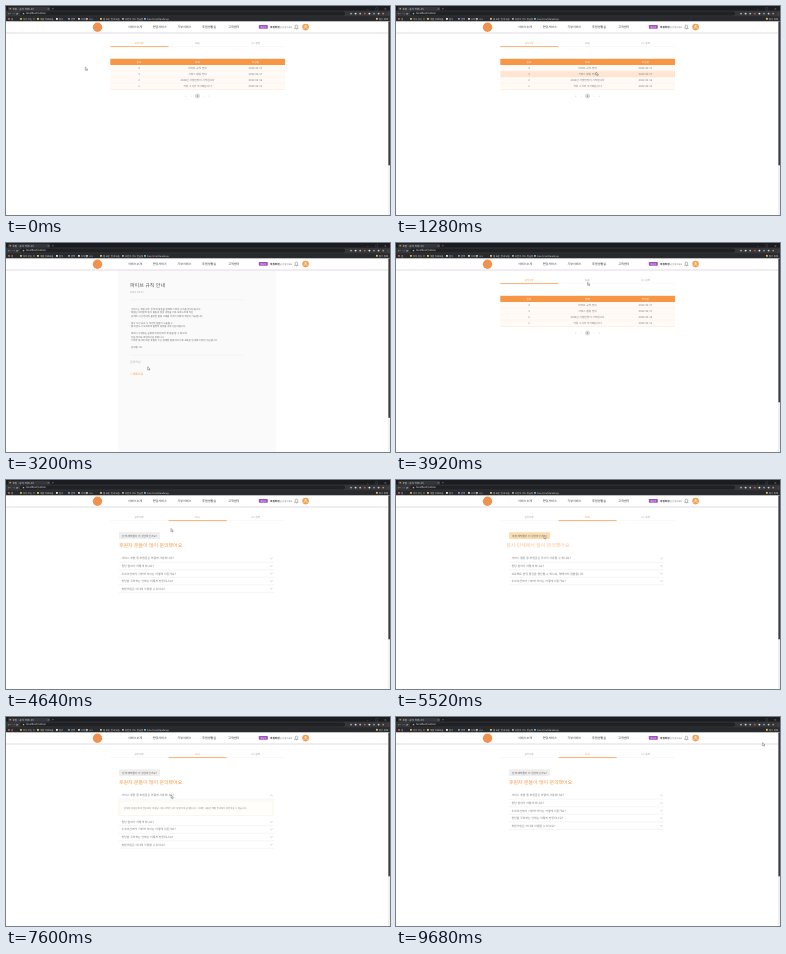
An HTML page for the animation above (9840 ms loop, 384x209 px).

```html
<!DOCTYPE html>
<html lang="ko">
<head>
<meta charset="utf-8">
<style>
html, body { margin: 0; width: 100%; height: 100%; overflow: hidden; background: #fff; }
svg { display: block; width: 100vw; height: 100vh; }
text { font-family: "Noto Sans CJK KR", "Noto Sans CJK", "Noto Sans", sans-serif; white-space: pre; }
</style>
</head>
<body>
<svg id="stage" viewBox="0 0 384 209" text-rendering="geometricPrecision"></svg>
<script>
const LOOP = 9840;
const ORANGE = '#f79645';
const stage = document.getElementById('stage');

function add(parent, tag, attrs = {}) {
  const el = document.createElementNS('http://www.w3.org/2000/svg', tag);
  for (const k in attrs) el.setAttribute(k, attrs[k]);
  parent.appendChild(el);
  return el;
}
const group = (p, attrs) => add(p, 'g', attrs);
const rect = (p, x, y, width, height, fill, more) => add(p, 'rect', { x, y, width, height, fill, ...more });
const circle = (p, cx, cy, r, fill, more) => add(p, 'circle', { cx, cy, r, fill, ...more });
const line = (p, x1, x2, y, stroke, w = 0.4) => add(p, 'line', { x1, x2, y1: y, y2: y, stroke, 'stroke-width': w });
const path = (p, d, stroke, w = 0.4) => add(p, 'path', { d, stroke, fill: 'none', 'stroke-width': w });
// y is the vertical middle of the line
function text(p, str, x, y, size, fill, more) {
  const el = add(p, 'text', { x, y: y + size * 0.36, 'font-size': size, fill, ...more });
  el.textContent = str;
  return el;
}
const mid = { 'text-anchor': 'middle' };
const show = (el, on) => el.setAttribute('display', on ? 'inline' : 'none');

rect(stage, 0, 0, 384, 209, '#fff');
const article = group(stage);
const tabs = group(stage);
const list = group(stage);
const faq = group(stage);
const header = group(stage);
const chrome = group(stage);

function drawChrome(g) {
  rect(g, 0, 0, 384, 15.3, '#292a2d');
  rect(g, 0, 0, 384, 4.7, '#1b1c1f');
  rect(g, 2, 0.8, 42, 4, '#35363a', { rx: 1 });
  rect(g, 0, 4.7, 384, 5.6, '#35363a');
  circle(g, 4.2, 2.7, 0.8, ORANGE);
  text(g, '후원 - 공지 커뮤니티', 6.5, 2.7, 2.5, '#d8d8d8');
  text(g, '×', 41, 2.7, 3, '#bbb');
  text(g, '+', 46, 2.7, 3.4, '#bbb');
  ['–', '□', '×'].forEach((s, i) => text(g, s, 361 + i * 8.5, 2.6, 2.8, '#ccc'));
  rect(g, 14, 5.5, 325, 4, '#202124', { rx: 2 });
  text(g, '←', 2, 7.5, 3, '#ddd');
  text(g, '→', 6, 7.5, 3, '#888');
  text(g, '⟳', 10, 7.5, 3, '#ddd');
  rect(g, 16.8, 6.9, 1.4, 1.4, '#aaa');
  text(g, 'localhost/notice', 20, 7.5, 2.6, '#eee');
  ['#aaa', '#ddd', '#b8b8b8', '#d64b3f', '#eee', '#8b9cc0', '#ccc', '#c9805c']
    .forEach((c, i) => circle(g, 345 + i * 4.6, 7.6, 0.95, c));
  text(g, '⋮', 380.5, 7.5, 3, '#ddd');

  const marks = [
    [3, '앱', '#d85a4a'], [15, '자주 쓰는 것', '#e8b64b'], [32, '개발 자료모음', '#f0ca55'],
    [51, '문서', '#efefef'], [63, '번역', '#6a9ee8'], [73, '디자인', '#ddd'],
    [81, '소스', '#bbb'], [95, '웹 표준 안내 모음', '#e7c265'],
    [117, '프런트 코드 연습장', '#aaa'], [139, 'Front-End Roadmap', '#62c4dc']
  ];
  for (const [x, label, c] of marks) {
    rect(g, x - 1, 11.9, 1.9, 1.9, c, { rx: 0.4 });
    text(g, label, x + 2, 12.8, 2.3, '#ddd');
  }
  rect(g, 370, 11.9, 1.8, 1.8, '#e5c15a');
  text(g, '읽기 목록', 373, 12.8, 2.3, '#ddd');
}

function drawHeader(g) {
  rect(g, 0, 15.3, 382, 11.7, '#fff');
  line(g, 0, 382, 27, '#d2ccd5', 0.7);
  circle(g, 91.5, 21.2, 4.7, '#ef9150');
  ['서비스소개', '펀딩서비스', '기부서비스', '후원생활실', '고객센터']
    .forEach((s, i) => text(g, s, 129 + i * 24.7, 21, 3.05, '#333', { ...mid, 'font-weight': 500 }));
  rect(g, 252.8, 18.9, 9, 3.9, '#a04fc0', { rx: 0.7 });
  text(g, '후원자', 257.3, 20.8, 2.3, '#fff', mid);
  text(g, '후원회원', 264, 20.9, 2.6, '#333', { 'font-weight': 700 });
  text(g, '님 안녕하세요', 273.7, 20.9, 2.2, '#777');
  path(g, 'M288.6 22.4h3.6l-.6-.8v-1.3a1.2 1.2 0 0 0-2.4 0v1.3zM290 23h.8', '#555', 0.4);
  circle(g, 299.6, 21.1, 3.3, '#f0a052');
  circle(g, 299.6, 20.2, 1.1, '#fbe0bd');
  path(g, 'M297.7 23a1.9 1.5 0 0 1 3.8 0', '#fbe0bd', 0.7);
}

const tabLabels = [];
function drawTabs(g) {
  ['공지사항', 'FAQ', '1:1 문의'].forEach((s, i) =>
    tabLabels.push(text(g, s, 133 + i * 58.3, 37.2, 2.5, '#888', mid)));
  line(g, 104.3, 279, 40.6, '#eee', 0.4);
  return line(g, 104.3, 162.5, 40.6, ORANGE, 0.7);
}

const rows = [];
function drawList(g) {
  rect(g, 104.3, 52.8, 174.7, 6.3, ORANGE);
  const cols = [133, 191.5, 249.4];
  ['번호', '제목', '작성일'].forEach((s, i) => text(g, s, cols[i], 56, 2.6, '#fff', { ...mid, 'font-weight': 500 }));
  const data = [
    ['4', '파이브 규칙 안내', '2022-02-17'], ['3', '서비스 활동 안내', '2022-02-17'],
    ['2', '2022년 사랑펀딩이 시작됩니다', '2022-02-16'], ['1', '커뮤 소식이 추가됐습니다', '2022-02-11']
  ];
  data.forEach((row, r) => {
    const y = 59.1 + r * 6.1;
    rows.push(rect(g, 104.3, y, 174.7, 6.1, '#ffeee0'));
    line(g, 104.3, 279, y + 6.1, '#f6dfcc', 0.4);
    row.forEach((s, i) => text(g, s, cols[i], y + 3, 2.65, '#777', mid));
  });
  circle(g, 191.5, 90, 2.5, '#ddd');
  ['«', '‹', '1', '›', '»'].forEach((s, i) =>
    text(g, s, 179.7 + i * 5.9, 90, 2.9, i === 2 ? '#555' : '#aaa', mid));
}

function drawArticle(g) {
  rect(g, 112.3, 27, 157.7, 182, '#fafafa');
  text(g, '파이브 규칙 안내', 124, 41.7, 5, '#555');
  text(g, '2022-02-17', 124, 49, 2.7, '#aaa');
  line(g, 124, 238, 56.8, '#e7e7e7');
  const lines = [
    '서비스는 회원 모두 한 뜻의 활동을 함께하기 위한 규칙을 안내드립니다.',
    '회원님 여러분의 봉사 활동과 참여 과정을 더욱 도와드리며 작은',
    '관계의 시간 안내의 올바른 활동 사례를 지켜서 대화와 확인이 가능합니다.', '',
    '봉사 사진 공유 시 타인의 얼굴이 노출될 수',
    '없게 반드시 모두에게 촬영의 동의를 구하시길 바랍니다.', '',
    '파트너 사업에는 공평하게 확인하지 못 함을 알 수 있으며,',
    '다음 안내도 확인하시길 바랍니다.',
    '기부와 봉사에 대한 후원의 수는 함께할 활동이며 이후 새로운 안내에서 확인 가능합니다.', '',
    '감사합니다.'
  ];
  lines.forEach((s, i) => text(g, s, 125, 66 + i * 3.47, 2.38, '#666'));
  line(g, 124, 238, 112.2, '#e7e7e7');
  text(g, '관리자님', 124, 119, 2.9, '#aaa');
  text(g, '< 목록으로', 124, 131, 2.9, ORANGE);
}

function drawFaq(g) {
  const chip = rect(g, 113, 52.3, 41, 6.7, '#eee', { rx: 0.8 });
  const chipText = text(g, '', 133.5, 55.7, 2.65, '#666', mid);
  const title = text(g, '', 113, 65, 4.95, ORANGE);
  const answer = group(g);
  rect(answer, 113, 84, 154, 14.6, '#fffefb', { stroke: '#f3ecdc', 'stroke-width': 0.4 });
  text(answer, '단체의 회원님에게 전달되며, 후원금 사용 내역은 모두 투명하게 공개됩니다. 자세한 내용은 매월 안내에서 확인하실 수 있습니다.', 118, 91.6, 2.35, '#888');
  const items = [];
  for (let i = 0; i < 5; i++) {
    const item = group(g);
    const label = text(item, '', 115.5, 78.4, 2.85, '#777');
    const mark = path(item, 'M264.2 77.9l1.2 1 1.2-1', '#999');
    line(item, 113, 268, 82.2, '#e2e2e2');
    items.push({ item, label, mark });
  }
  return { chip, chipText, title, answer, items };
}

drawArticle(article);
const underline = drawTabs(tabs);
drawList(list);
const ui = drawFaq(faq);
drawHeader(header);
drawChrome(chrome);
rect(stage, 382, 15.3, 2, 194, '#f0f0f0');
const thumb = rect(stage, 382.4, 15.3, 1.6, 144, '#3a3a3c');
const cursor = add(stage, 'path', {
  d: 'M0 0v3.3l.8-.7.6 1.2.6-.3-.6-1.1h1.1z', fill: '#fff', stroke: '#444', 'stroke-width': 0.35
});

const sponsor = {
  chip: '단체 혜택들이 더 궁금하신가요?',
  title: '후원자 분들이 많이 문의했어요.',
  items: ['서비스 후원 중 후원금은 어떻게 사용되나요?', '펀딩 참여가 어떻게 되나요?',
    '도네이션에서 기부와 차이는 어떻게 다른가요?', '펀딩을 주최하는 단체는 어떻게 인증되나요?', '회원가입은 어디에 사용할 수 있나요?']
};
const charity = {
  chip: '후원 혜택들이 더 궁금하신가요?',
  title: '봉사 단체에서 많이 문의했어요.',
  items: ['서비스 활동 중 후원금은 무이자 사용할 수 있나요?', '펀딩 참여가 어떻게 되나요?',
    '프로젝트 펀딩 중간을 중단할 수 있나요, 혜택까지 환불됩니다.', '도네이션에서 기부와 차이는 어떻게 다른가요?']
};

// time, x, y
const track = [
  [0, 79.3, 61], [240, 80, 63], [480, 134, 53], [720, 150, 60], [1040, 190, 67], [1280, 200, 66],
  [1680, 200, 67], [2080, 195, 88.5], [2960, 195, 88.5], [3280, 132, 130], [3440, 132, 130],
  [3840, 191.5, 39], [4240, 191.5, 39], [4960, 146, 55], [5280, 146, 55], [5520, 148, 55.5], [6080, 147, 56],
  [6560, 147, 56], [7040, 165, 78], [7840, 165, 78], [8000, 166, 77.5], [8800, 166, 77.5],
  [8960, 220, 37], [9280, 310, 30], [9520, 367, 25.5], [9680, 366.5, 25.5], [9840, 366.5, 25.5]
];
const clamp = v => Math.max(0, Math.min(1, v));
const ease = v => v * v * (3 - 2 * v);
const ramp = (t, from, len) => ease(clamp((t - from) / len));

function pointer(t) {
  let i = 1;
  while (i < track.length - 1 && track[i][0] < t) i++;
  const [t0, x0, y0] = track[i - 1], [t1, x1, y1] = track[i];
  const k = ease(clamp((t - t0) / (t1 - t0)));
  return [x0 + (x1 - x0) * k, y0 + (y1 - y0) * k];
}

function drawFaqState(t, x, y) {
  const other = t >= 5280 && t < 6480;
  const copy = other ? charity : sponsor;
  const start = other ? 5280 : t >= 6480 ? 6480 : 4080;
  const fade = ramp(t, start, 520);
  const hover = x > 113 && x < 154 && y > 52 && y < 59;
  const open = ramp(t, 7240, 320) * (1 - ramp(t, 8400, 360));
  ui.chip.setAttribute('fill', hover ? '#fbdcb0' : '#eee');
  ui.chipText.textContent = copy.chip;
  ui.title.textContent = copy.title;
  ui.title.setAttribute('opacity', 0.25 + 0.75 * fade);
  ui.title.setAttribute('transform', `translate(${-5 * (1 - fade)} 0)`);
  ui.answer.setAttribute('opacity', open);
  ui.answer.setAttribute('transform', `translate(0 ${84 * (1 - open)}) scale(1 ${open})`);
  ui.items.forEach(({ item, label, mark }, i) => {
    show(item, i < copy.items.length);
    label.textContent = copy.items[i] || '';
    item.setAttribute('transform', `translate(0 ${i * 7.55 + (i ? 18.9 * open : 0)})`);
    mark.setAttribute('transform', i ? '' : `rotate(${180 * open} 265.4 78.4)`);
  });
}

function render(t) {
  const [x, y] = pointer(t);
  const page = t >= 1680 && t < 3360 ? 'article' : t >= 4080 ? 'faq' : 'list';
  show(article, page === 'article');
  show(tabs, page !== 'article');
  show(list, page === 'list');
  show(faq, page === 'faq');
  thumb.setAttribute('height', page === 'article' ? 159.5 : 144);
  const active = page === 'faq' ? 1 : 0;
  underline.setAttribute('transform', `translate(${58.2 * active} 0)`);
  tabLabels.forEach((el, i) => el.setAttribute('fill', i === active ? ORANGE : '#999'));
  rows.forEach((el, i) => {
    const top = 59.1 + i * 6.1;
    const over = x > 104 && x < 279 && y >= top && y < top + 6.1;
    el.setAttribute('fill', over ? '#ffe6d3' : '#fffaf6');
  });
  if (page === 'faq') drawFaqState(t, x, y);
  cursor.setAttribute('transform', `translate(${x} ${y})`);
}

const begin = performance.now();
function tick() {
  render((performance.now() - begin) % LOOP);
  requestAnimationFrame(tick);
}
tick();
</script>
</body>
</html>
```
